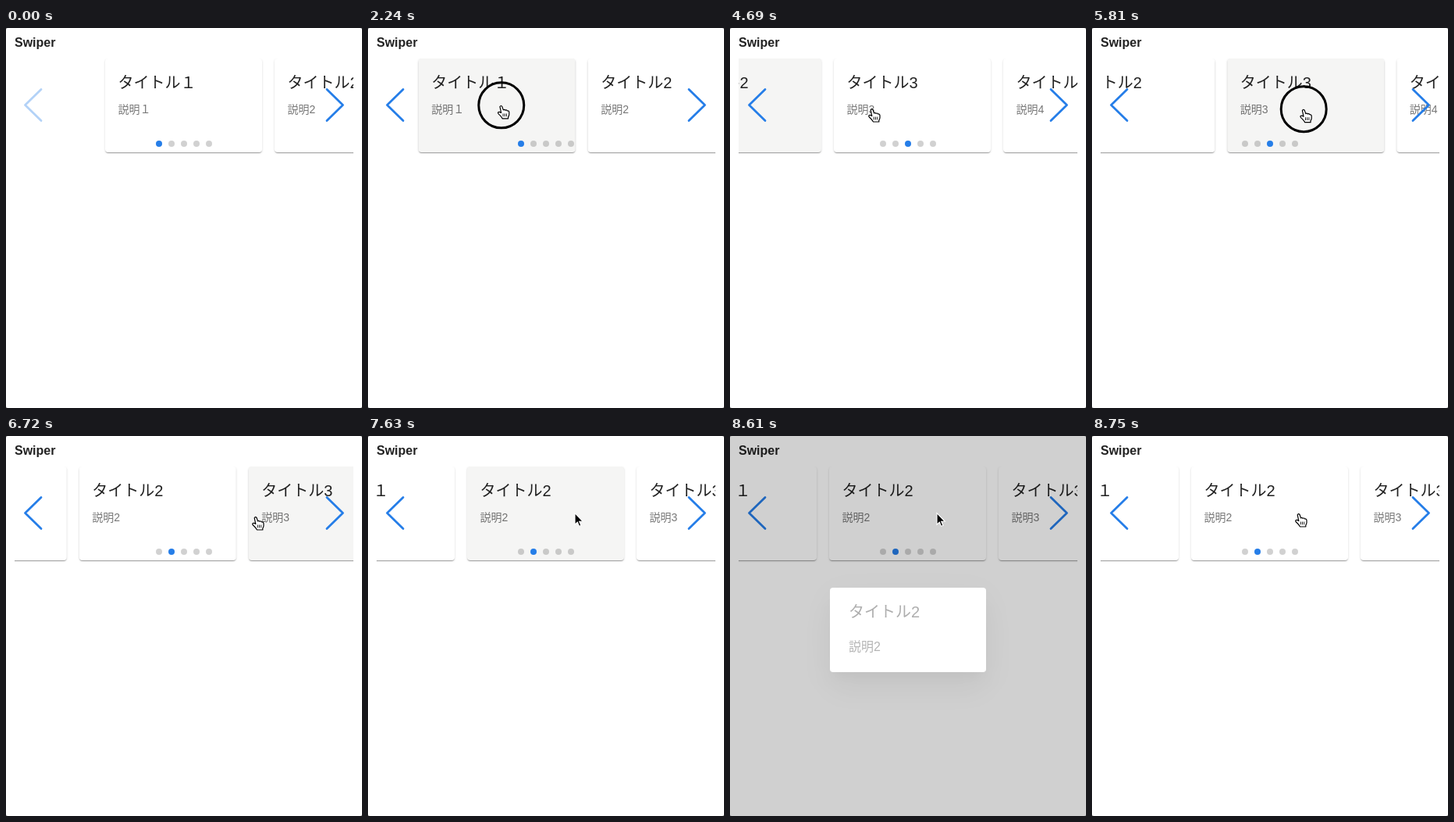
Animation of 456x486 px, one loop 8960 ms. Source, as an HTML page:

```html
<!DOCTYPE html>
<html lang="ja">
<head>
<meta charset="utf-8">
<style>
  html, body { margin: 0; width: 100%; height: 100%; overflow: hidden; background: #777; }
  #stage { position: absolute; left: 0; top: 0; width: 456px; height: 486px; overflow: hidden; background: #fff; border-radius: 2.5px; }
  svg { position: absolute; left: 0; top: 0; width: 100%; height: 100%; overflow: visible; }
  text { font-family: "Liberation Sans", Arial, "Noto Sans CJK JP", "Noto Sans CJK", sans-serif; }
  .title { font-size: 20px; fill: rgba(0, 0, 0, .87); }
  .note { font-size: 14px; fill: rgba(0, 0, 0, .54); }
  #view { position: absolute; left: 11px; top: 39px; width: 434px; height: 124px; overflow: hidden; }
  #track { position: absolute; left: 0; top: 0; }
  .card {
    position: absolute; top: 0; width: 200.5px; height: 120px; border-radius: 4px; background: #fff;
    box-shadow: 0 2px 1px -1px rgba(0,0,0,.2), 0 1px 1px rgba(0,0,0,.14), 0 1px 3px rgba(0,0,0,.12);
  }
  .card.hover { background: #f5f5f4; }
  #modal { position: absolute; inset: 0; opacity: 0; }
  #backdrop { position: absolute; inset: 0; background: rgba(0, 0, 0, .5); }
  #paper {
    position: absolute; left: 128px; top: 194px; width: 200px; height: 108px; border-radius: 4px; background: #fff;
    box-shadow: 0 11px 15px -7px rgba(0,0,0,.2), 0 24px 38px 3px rgba(0,0,0,.14), 0 9px 46px 8px rgba(0,0,0,.12);
  }
  .arrow { fill: none; stroke: #267ee8; stroke-width: 2.8; stroke-linecap: round; stroke-linejoin: round; }
</style>
</head>
<body>
<div id="stage">
  <svg><text x="11" y="24" font-size="16" font-weight="700" fill="#222">Swiper</text></svg>
  <div id="view"><div id="track"></div></div>
  <svg>
    <g id="dots"></g>
    <path id="prev" class="arrow" d="M45 78.5 24.5 98.5 45 118.5"/>
    <path class="arrow" d="M411 78.5 431.5 98.5 411 118.5"/>
  </svg>
  <div id="modal">
    <div id="backdrop"></div>
    <div id="paper">
      <svg>
        <text class="title" x="24" y="38">タイトル2</text>
        <text x="24" y="81" font-size="16" fill="rgba(0,0,0,.8)">説明2</text>
      </svg>
    </div>
  </div>
  <svg>
    <g id="cursor">
      <circle id="ring" fill="none" stroke="#000" stroke-width="3"/>
      <path id="pointer" fill="#000" stroke="#fff" stroke-width="1.2" transform="scale(.92)"
        d="M0 -.5V15.5L3.7 12.2 6 17.8 8.6 16.8 6.2 11.2H11.2Z"/>
      <g id="hand" stroke="#000" stroke-width="1.2" stroke-linejoin="round" stroke-linecap="round">
        <path fill="#fff" d="M-1.8 1.8Q-.6-.3 1 1.5L2.6 6Q4 4.8 5 6.3 6.8 5.4 7.4 7 9.6 6.6 10 8.8V12Q9.6 14 8.8 15V17H1.5Q0 14.5-2 12.5-5 10-4 8.8-2.5 7.8-.2 9.6Z"/>
        <path fill="none" stroke-width=".9" d="M2.3 11V14M4.5 11V14M6.7 11V14"/>
      </g>
    </g>
  </svg>
</div>
<script>
const LOOP = 8960, STEP = 70, PITCH = 217, COUNT = 5;
const SNAP = 300, FOLLOW = .84, OPEN = 7625, CLOSE = 8530;
const $ = id => document.getElementById(id);

function bezier(x1, y1, x2, y2) {
  const at = (a, b, s) => 3 * a * s * (1 - s) ** 2 + 3 * b * s * s * (1 - s) + s ** 3;
  return x => {
    let lo = 0, hi = 1;
    for (let i = 0; i < 24; i++) {
      const mid = (lo + hi) / 2;
      if (at(x1, x2, mid) < x) lo = mid; else hi = mid;
    }
    return at(y1, y2, lo);
  };
}
const ease = bezier(.25, .1, .25, 1);
const standard = bezier(.4, 0, .2, 1);
const smooth = p => p * p * (3 - 2 * p);
const ramp = (t, start, length) => Math.max(0, Math.min(1, (t - start) / length));

// Pointer strokes; a stroke with a press drags the slides and settles on slide `to`
const strokes = [
  { start: 260, end: 350, x: 240, y: 333 },
  { start: 560, end: 1050, x: 239, y: 115 },
  { start: 1400, end: 1820, x: 245, y: 98 },
  { start: 2020, end: 2310, x: 158, y: 99, press: 1960, to: 0 },
  { start: 2730, end: 3010, x: 230, y: 108 },
  { start: 3150, end: 3360, x: 136, y: 107, press: 3080, to: 1 },
  { start: 3640, end: 3920, x: 284, y: 104 },
  { start: 4270, end: 4470, x: 182, y: 103, press: 4130, to: 2 },
  { start: 4970, end: 5390, x: 216, y: 103 },
  { start: 5530, end: 6000, x: 302, y: 104, press: 5460, to: 2 },
  { start: 6000, end: 6370, x: 216, y: 103 },
  { start: 6440, end: 6586, x: 320, y: 103, press: 6370, to: 1 },
  { start: 6800, end: 7210, x: 265, y: 99 }
];
const clicks = [{ at: 1190, r: 20 }, { at: 7490, r: 29 }, { at: 8400, r: 21 }];

function stateAt(t) {
  const s = { x: 244, y: 410, shift: 0, active: 0, hover: 0, dragging: false, ring: 0 };
  for (const k of strokes) {
    if (t >= k.press && t < k.end) s.ring = 29;
    if (t < k.start) break;
    const p = smooth(ramp(t, k.start, k.end - k.start));
    const dx = (k.x - s.x) * p;
    s.x += dx;
    s.y += (k.y - s.y) * p;
    s.hover = s.active;
    s.dragging = k.press && t < k.end;
    if (!k.press) continue;
    const held = -s.active * PITCH + dx * FOLLOW;
    const settle = ease(ramp(t, k.end, SNAP));
    s.shift = held + (-k.to * PITCH - held) * settle;
    if (t >= k.end) s.active = k.to;
  }
  const click = clicks.find(c => t >= c.at && t < c.at + 2 * STEP);
  if (click) s.ring = click.r;
  return s;
}

const cards = [], dots = [];
for (let i = 0; i < COUNT; i++) {
  const n = i ? i + 1 : "１";
  const card = document.createElement("div");
  card.style.left = 116.3 + i * PITCH + "px";
  card.innerHTML = `<svg>
    <text class="title" x="16.5" y="37.5">タイトル${n}</text>
    <text class="note" x="16.5" y="69.5">説明${n}</text></svg>`;
  $("track").append(card);
  cards.push(card);

  const dot = document.createElementNS("http://www.w3.org/2000/svg", "circle");
  dot.setAttribute("cx", 196 + 16 * i);
  dot.setAttribute("cy", 148);
  dot.setAttribute("r", 4);
  $("dots").append(dot);
  dots.push(dot);
}

const show = (id, on) => $(id).style.display = on ? "" : "none";

function draw(t) {
  const s = stateAt(t);
  const inside = s.y < 159;
  $("track").style.transform = `translateX(${s.shift}px)`;
  cards.forEach((c, i) => c.className = inside && t < CLOSE && i === s.hover ? "card hover" : "card");
  dots.forEach((d, i) => d.setAttribute("fill", i === s.active ? "#267ee8" : "rgba(0,0,0,.18)"));
  $("prev").style.opacity = s.active || s.dragging ? 1 : .35;
  $("modal").style.opacity = standard(ramp(t, OPEN, 225)) * (1 - standard(ramp(t, CLOSE, 195)));

  const hand = inside && (t < OPEN || t > CLOSE + 150);
  $("cursor").setAttribute("transform", `translate(${s.x} ${s.y})`);
  show("cursor", t >= 280);
  show("hand", hand);
  show("pointer", !hand);
  show("ring", s.ring);
  $("ring").setAttribute("r", s.ring);
}

const begin = performance.now();
function tick() {
  const t = (performance.now() - begin) % LOOP;
  draw(Math.floor(t / STEP) * STEP);
  requestAnimationFrame(tick);
}
draw(0);
requestAnimationFrame(tick);
</script>
</body>
</html>
```
